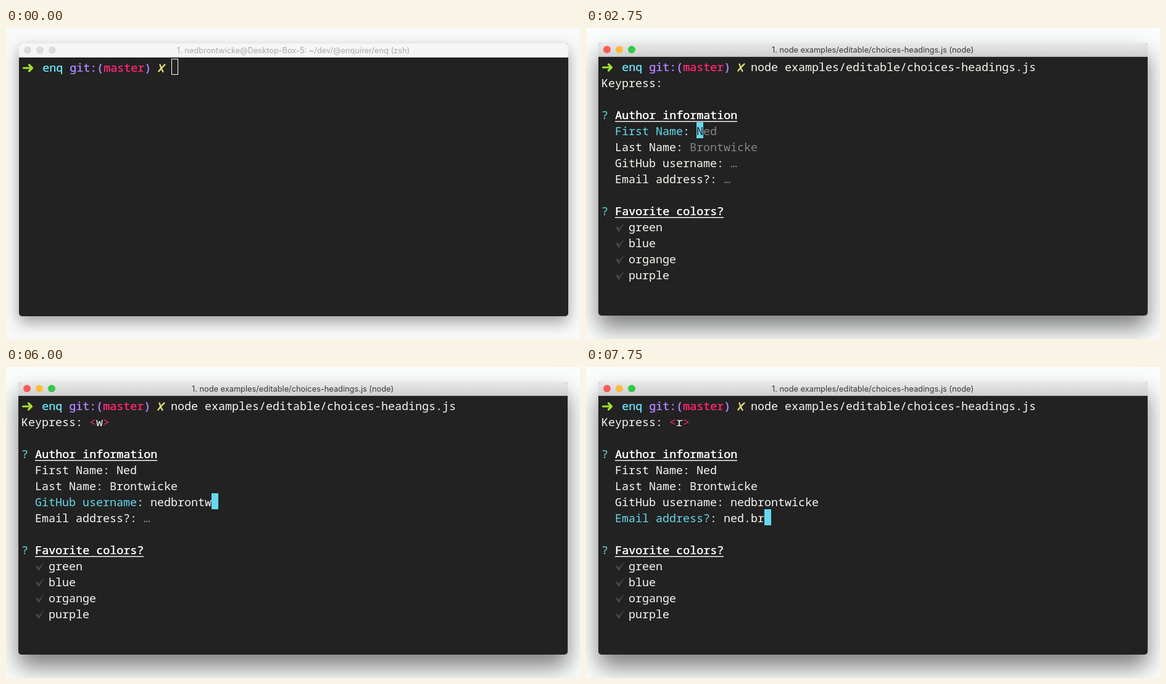
Write an HTML page with a canvas that moves like this. It is 930 px wide and 505 px high and loops after 8000 ms.

```html
<!DOCTYPE html>
<html lang="en">
<head>
<meta charset="utf-8">
<title>Terminal prompt</title>
<style>
  html, body { margin: 0; width: 100%; height: 100%; overflow: hidden; background: #fafbfa; }
  canvas { display: block; }
</style>
</head>
<body>
<canvas id="stage" width="930" height="505"></canvas>
<script>
const ctx = document.getElementById('stage').getContext('2d');
const LOOP = 8000, CELL = 11, LINE = 26, LEFT = 25, TOP = 49;
const C = {
  back: '#222222', text: '#f8f8f2', bold: '#ffffff', dim: '#858585', faint: '#4a483f',
  cyan: '#66d9ef', pink: '#f92672', purple: '#ae81ff', green: '#a6e22e', yellow: '#e6db74',
  cursor: '#ebf5f1'
};

const COMMAND = 'node examples/editable/choices-headings.js';
const SHELL_TITLE = '1. nedbrontwicke@Desktop-Box-5: ~/dev/@enquirer/enq (zsh)';
const FIELDS = [
  { label: 'First Name', value: 'Ned', hint: 'Ned' },
  { label: 'Last Name', value: 'Brontwicke', hint: 'Brontwicke' },
  { label: 'GitHub username', value: 'nedbrontwicke', hint: '…' },
  { label: 'Email address?', value: 'ned.brontwicke', hint: '…' }
];
const COLORS = ['green', 'blue', 'organge', 'purple'];

// [start ms, active field, characters entered, key name if not the last character]
const STEPS = [
  [2000, 0, 0, ''], [3000, 0, 3, 'tab'], [3500, 0, 3, ''],
  [3750, 1, 0, 'tab'], [4000, 1, 10, 'tab'], [4500, 2, 0, 'tab'],
  [5000, 2, 1], [5250, 2, 3], [5500, 2, 4], [5750, 2, 7],
  [6000, 2, 9], [6250, 2, 12], [6500, 2, 13], [6750, 3, 0, 'tab'],
  [7000, 3, 2], [7250, 3, 3], [7500, 3, 4, 'undefined'], [7750, 3, 6]
];

const ARROW = new Path2D('M2.5 15H16M11.5 10l5 5-5 5');
const CROSS = new Path2D('M1.5 20.5Q6 14 11.5 9.5M3.5 9.5Q5 16 8.5 21');
const CHECK = new Path2D('M1 15.5l3.5-2 2.2 4Q10 11 15.5 8.5 10 14 7 21.3H5Q3.5 18 1 15.5z');

const colX = col => LEFT + col * CELL;
const rowY = row => TOP + row * LINE;

// Writes on the character grid and returns the next free column.
function write(row, col, text, color = C.text, bold = false) {
  ctx.font = '18.33px "Noto Sans Mono", monospace';
  ctx.textAlign = 'left';
  ctx.fillStyle = color;
  for (const ch of text) {
    const x = colX(col++), y = rowY(row) + 21;
    ctx.fillText(ch, x, y);
    if (bold) ctx.fillText(ch, x + 0.6, y);
  }
  return col;
}

function block(row, col, color) {
  ctx.fillStyle = color;
  ctx.fillRect(colX(col), rowY(row), CELL, LINE);
}

function symbol(path, row, col, color, width) {
  ctx.save();
  ctx.translate(colX(col), rowY(row));
  ctx.fillStyle = ctx.strokeStyle = color;
  ctx.lineWidth = width;
  ctx.lineCap = ctx.lineJoin = 'round';
  if (width) ctx.stroke(path); else ctx.fill(path);
  ctx.restore();
}

function drawWindow(active, title) {
  ctx.fillStyle = active ? '#fbfdfc' : '#f9f9f9';
  ctx.fillRect(0, 0, 930, 505);
  ctx.save();
  if (!active) ctx.translate(1, 1);

  ctx.save();
  ctx.shadowColor = active ? 'rgba(0,0,0,.5)' : 'rgba(0,0,0,.36)';
  ctx.shadowBlur = active ? 36 : 24;
  ctx.shadowOffsetY = active ? 20 : 10;
  ctx.fillStyle = C.back;
  ctx.beginPath();
  ctx.roundRect(20, 24, 890, 443, 5);
  ctx.fill();
  ctx.restore();

  const bar = ctx.createLinearGradient(0, 24, 0, 46);
  bar.addColorStop(0, active ? '#e9e9e9' : '#f6f6f6');
  bar.addColorStop(1, active ? '#d0d0d0' : '#f6f6f6');
  ctx.fillStyle = bar;
  ctx.beginPath();
  ctx.roundRect(20, 24, 890, 22, [5, 5, 0, 0]);
  ctx.fill();
  ctx.fillStyle = active ? '#b4b4b4' : '#d6d6d6';
  ctx.fillRect(20, 46, 890, 1);

  ['#fc5b57', '#fdbc40', '#34c84a'].forEach((color, i) => {
    ctx.fillStyle = active ? color : '#dcdcdc';
    ctx.beginPath();
    ctx.arc(34 + 20 * i, 35, 6, 0, 7);
    ctx.fill();
  });

  ctx.font = '12.8px Inter, sans-serif';
  ctx.textAlign = 'center';
  ctx.fillStyle = active ? '#393939' : '#a9a9a9';
  ctx.fillText(title, 464.5, 40);
  ctx.restore();
}

function drawShellLine() {
  symbol(ARROW, 0, 0, C.green, 3.2);
  write(0, 3, 'enq', C.cyan, true);
  let col = write(0, 7, 'git:(', C.purple, true);
  col = write(0, col, 'master', C.pink, true);
  write(0, col, ')', C.purple, true);
  symbol(CROSS, 0, 20, C.yellow, 2.3);
}

function heading(row, text) {
  write(row, 0, '?', C.cyan);
  write(row, 2, text, C.bold, true);
  ctx.fillRect(colX(2), rowY(row) + 24, text.length * CELL, 1.4);
}

function drawField(field, row, active, typed) {
  let col = write(row, 2, field.label, active ? C.cyan : C.text);
  col = write(row, col, ':') + 1;
  const hinted = field.hint !== '…';
  if (typed) {
    col = write(row, col, field.value.slice(0, typed));
  } else if (!active || hinted) {
    write(row, col, field.hint, C.dim);
  }
  if (active) {
    block(row, col, C.cyan);
    if (!typed && hinted) write(row, col, field.hint[0], C.back);
  }
}

function drawForm(t) {
  const [, current, typed, name] = STEPS.filter(step => step[0] <= t).pop();
  const key = name ?? FIELDS[current].value[typed - 1];

  write(1, 0, 'Keypress:');
  if (key) {
    let col = write(1, 10, '<', C.pink);
    col = write(1, col, key);
    write(1, col, '>', C.pink);
  }

  heading(3, 'Author information');
  FIELDS.forEach((field, i) => {
    const count = i < current ? field.value.length : i === current ? typed : 0;
    drawField(field, 4 + i, i === current, count);
  });

  heading(9, 'Favorite colors?');
  COLORS.forEach((color, i) => {
    symbol(CHECK, 10 + i, 2, C.faint);
    write(10 + i, 4, color);
  });
}

function render(t) {
  const active = t >= 750;
  const process = t < 2750 ? 'zsh' : 'node';
  drawWindow(active, t < 2000 ? SHELL_TITLE : `1. ${COMMAND} (${process})`);

  ctx.save();
  if (!active) ctx.translate(1, 1);
  drawShellLine();
  const end = t < 1500 ? 22 : write(0, 22, COMMAND);
  if (!active) {
    ctx.strokeStyle = C.bold;
    ctx.lineWidth = 1;
    ctx.strokeRect(colX(end) + 0.5, TOP + 0.5, CELL - 1, LINE - 1);
  } else if (t < 2000) {
    block(0, end, C.cursor);
  } else {
    drawForm(t);
  }
  ctx.restore();
}

const start = performance.now();
function tick() {
  render((performance.now() - start) % LOOP);
  requestAnimationFrame(tick);
}
tick();
</script>
</body>
</html>
```
